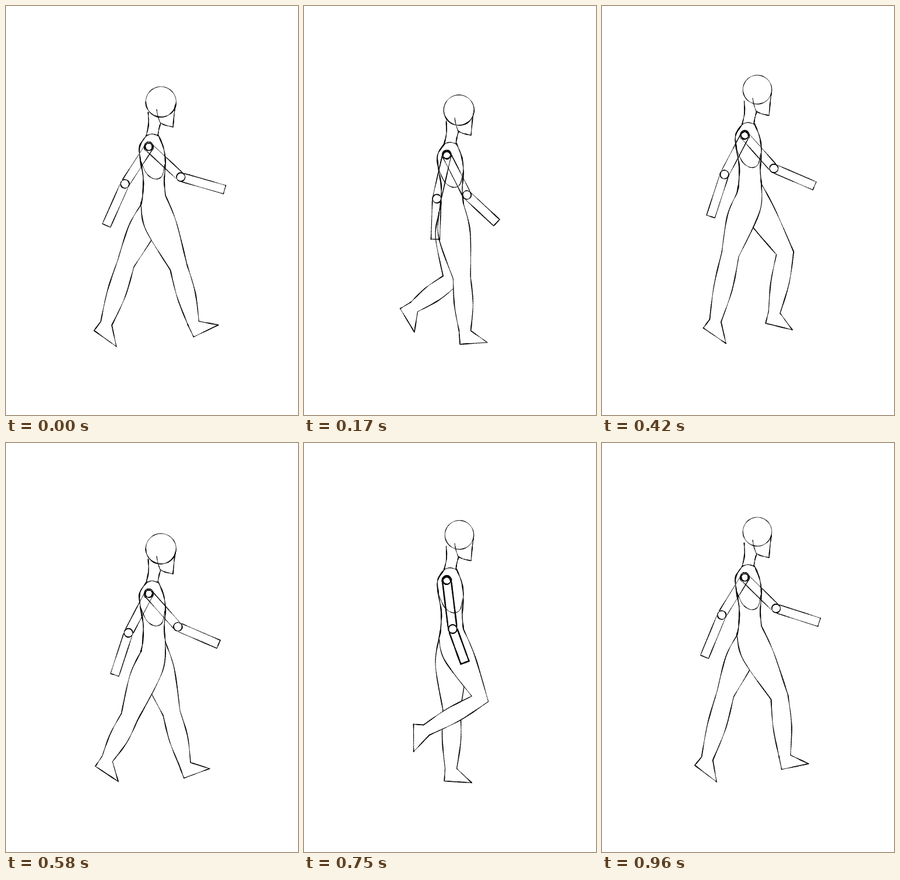
Animation of 500 by 700 pixels, one loop 1000 ms. Source, as an HTML page with a canvas:

```html
<!DOCTYPE html>
<html lang="en">
<head>
<meta charset="utf-8">
<title>Walk cycle</title>
<style>
html, body { margin: 0; width: 100%; height: 100%; overflow: hidden; background: #fff; }
canvas { display: block; }
</style>
</head>
<body>
<canvas id="stage" width="500" height="700"></canvas>
<script>
const ctx = document.getElementById('stage').getContext('2d');
const STEPS = 24, LOOP = 1000, TURN = 2 * Math.PI;

// Gait as waves: mean, then cosine and sine parts of each harmonic.
const gait = {
  kneeX: [263.7, 47.9, -19.8, -13.4, -11, -2.6, 4.5],
  kneeY: [445.6, -2.4, 5.4, -1.4, 24, 5.3, -3.7],
  ankleX: [238.4, 67.5, 19.3, 7.8, -2.7, 7, -1.7],
  ankleY: [533.5, -1.6, 25.9, 9.3, 7.9, 1, -7.1],
  foot: [25.8, -21.5, -34.3, -20.9, -10, -9.2, 8.8]
};

let seed = 0;

const rad = deg => deg * Math.PI / 180;
const add = (p, x, y) => [p[0] + x, p[1] + y];

function wave([mean, ...parts], x) {
  return parts.reduce((sum, c, i) => {
    const a = x * (1 + (i >> 1));
    return sum + c * (i % 2 ? Math.sin(a) : Math.cos(a));
  }, mean);
}

function unit(a, b) {
  const x = b[0] - a[0], y = b[1] - a[1], n = Math.hypot(x, y);
  return [x / n, y / n];
}

// Smooth curve through a few points.
function curve(pts, n = 12) {
  const out = [];
  for (let i = 0; i < pts.length - 1; i++) {
    const b = pts[i], c = pts[i + 1];
    const a = pts[i - 1] || b, d = pts[i + 2] || c;
    for (let j = i ? 1 : 0; j <= n; j++) {
      const u = j / n;
      out.push([0, 1].map(q => b[q] + 0.5 * u * (c[q] - a[q]
        + u * (2 * a[q] - 5 * b[q] + 4 * c[q] - d[q]
        + u * (3 * (b[q] - c[q]) + d[q] - a[q])))));
    }
  }
  return out;
}

// Ink line with uneven pressure.
function ink(line, w) {
  seed += 2.3;
  for (let i = 1; i < line.length; i++) {
    const press = 0.95 + 0.3 * Math.sin(i * 0.42 + seed) + 0.15 * Math.sin(i * 1.1 + seed * 3);
    ctx.lineWidth = w * press;
    ctx.beginPath();
    ctx.moveTo(...line[i - 1]);
    ctx.lineTo(...line[i]);
    ctx.stroke();
  }
}

const pen = (pts, w) => ink(curve(pts), w);

function arc(x, y, rx, ry, from, to, w) {
  const line = [];
  for (let i = 0; i <= 36; i++) {
    const a = rad(from + (to - from) * i / 36);
    line.push([x + rx * Math.cos(a), y + ry * Math.sin(a)]);
  }
  ink(line, w);
}

const ring = (p, r, w) => arc(p[0], p[1], r, r, -100, 265, w);

// Line from a to b pushed aside at share u of its length.
function bow(a, b, u, dx, dy) {
  return [a, [a[0] + (b[0] - a[0]) * u + dx, a[1] + (b[1] - a[1]) * u + dy], b];
}

function leg(phase, top) {
  const x = phase / STEPS * TURN;
  const { kneeX, kneeY, ankleX, ankleY, foot } = gait;
  const hip = [252, top + 194];
  const knee = [wave(kneeX, x), wave(kneeY, x)];
  const ankle = [wave(ankleX, x), wave(ankleY, x)];
  const tilt = rad(wave(foot, x));
  const thigh = unit(hip, knee), shin = unit(knee, ankle);
  const bend = unit([0, 0], add(thigh, ...shin));

  const side = (p, dir, s) => add(p, dir[1] * s, -dir[0] * s);
  const sole = l => add(ankle,
    l * Math.cos(tilt) - 22 * Math.sin(tilt),
    l * Math.sin(tilt) + 22 * Math.cos(tilt));
  const hipF = add(hip, 21, -8), hipB = add(hip, -21, 8);
  const kneeF = side(knee, bend, 15), kneeB = side(knee, bend, -15);
  const ankF = side(ankle, shin, 10), ankB = side(ankle, shin, -10);
  const heel = sole(-10), toe = sole(37);

  const parts = [
    bow(hipF, kneeF, 0.38, 8 - 0.1 * (kneeF[0] - hipF[0]), 0),
    bow(kneeF, ankF, 0.5, 4 * shin[1], -4 * shin[0]),
    [ankF, toe],
    [toe, heel],
    [heel, ankB],
    bow(ankB, kneeB, 0.5, -3 * shin[1], 3 * shin[0]),
    bow(kneeB, hipB, 0.62, -8 - 0.06 * (kneeB[0] - hipB[0]), 0)
  ].map(p => curve(p));
  ctx.beginPath();
  parts.flat().forEach(p => ctx.lineTo(...p));
  ctx.fill();
  parts.forEach(p => ink(p, 1.4));
}

// Point along a limb: l down its length, s to its side.
function along(p, deg, l, s) {
  const sin = Math.sin(rad(deg)), cos = Math.cos(rad(deg));
  return add(p, sin * l + cos * s, cos * l - sin * s);
}

function arm(swing, top) {
  const mag = Math.abs(swing), low = 1 - mag;
  const w = 1.2 + 0.8 * low * low;
  const shoulder = [244.5, top + 103.5];
  const upper = 7 + 40 * swing, upperLen = 75 + 8 * low ** 3;
  const fore = 20 + (swing > 0 ? 54 : 44) * swing, foreLen = 61 + 17 * mag;
  const elbow = along(shoulder, upper, upperLen, 0);
  for (const s of [-7.5, 7.5]) {
    pen([along(shoulder, upper, 0, s), along(shoulder, upper, upperLen - 4, s)], w);
    pen([along(elbow, fore, 4, s), along(elbow, fore, foreLen, s)], w);
  }
  pen([along(elbow, fore, foreLen, -7.5), along(elbow, fore, foreLen, 7.5)], w);
  arc(shoulder[0], shoulder[1], 8, 9, 180 - upper, 360 - upper, w * 0.8);
  ring(elbow, 7.3, 1.5);
}

// The head and neck are drawn a little softer while the body is high.
function body(top, soft) {
  const line = (w, ...pts) => pen(pts.map(([x, y]) => [x, y + top]), w);
  const r = soft ? 24.7 : 26, x = soft ? 266 : 265.3;
  arc(x, top + r, r, r, 180, 360, 0.9);
  arc(x, top + r, r, r, 0, 180, soft ? 1.1 : 1.6);
  line(0.9, [258, 39], [260, 50], [264, 62]);
  line(1.2, [264, 62], [273, 66], [286, 69]);
  line(1.4, [290, 31], [288, 47], [286, 69]);
  line(1.6, [243.5, 44], [244, 65], [240, 84]);
  line(1.4, [265, 62], [262, 72], [260, 84]);
  line(1, [240, 84], [250, 81], [261, 84]);
  line(1.9, [241, 83], [229, 102], [230, 125], [235, 156], [234, 186], [231, 202]);
  line(1.7, [261, 83], [270, 106], [273, 131], [271, 161], [273, 186]);
  line(1, [231, 128], [241, 149], [255, 158], [267, 153], [272, 133]);
  ring([244.5, top + 103], 6.3, 2);
}

function draw(k) {
  const x = k / STEPS * TURN;
  const top = 135.3 + 21.3 * Math.sin(2 * x + 0.13);
  const swing = Math.cos(x);
  ctx.fillStyle = '#fff';
  ctx.strokeStyle = '#0a0a0a';
  ctx.lineCap = 'round';
  ctx.fillRect(0, 0, 500, 700);
  seed = k * 7.1;
  leg(k + STEPS / 2, top);
  leg(k, top);
  body(top, k % 12 > 4);
  arm(swing, top);
  arm(-swing, top);
}

// Drawings change 24 times a second, on whole hundredths.
function stepAt(ms) {
  let k = 0;
  while (k < STEPS - 1 && ms >= 10 * Math.round((k + 1) * 100 / STEPS)) k++;
  return k;
}

let shown = 0;
function tick(now) {
  const k = stepAt(now % LOOP);
  if (k !== shown) draw(shown = k);
  requestAnimationFrame(tick);
}
draw(shown);
requestAnimationFrame(tick);
</script>
</body>
</html>
```
